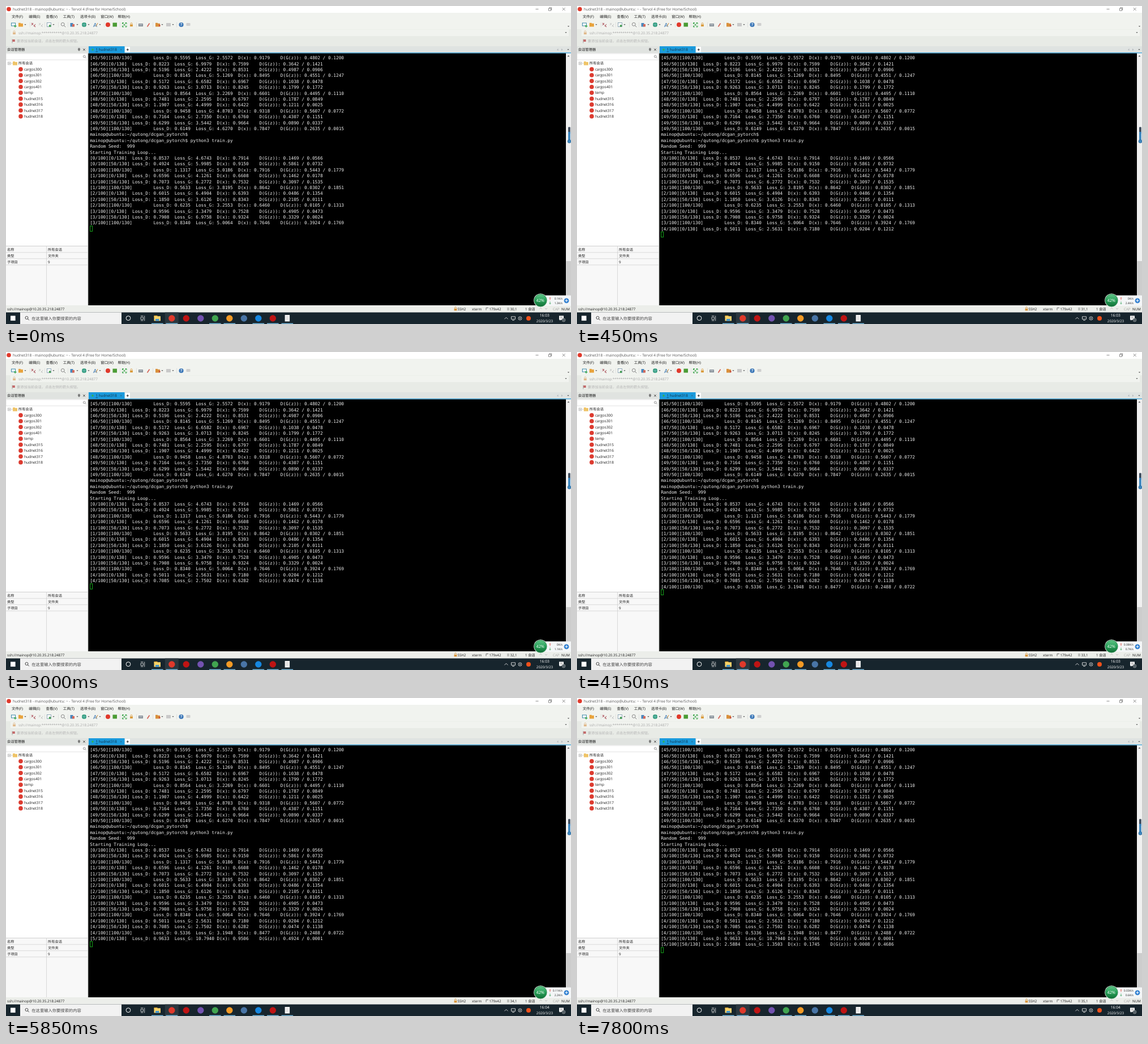
An HTML page that plays this animation: 998x561 px, repeating every 8000 ms.

```html
<!DOCTYPE html>
<html lang="zh">
<head>
<meta charset="utf-8">
<title>Terminal training log</title>
<style>
html, body { margin: 0; width: 100%; height: 100%; overflow: hidden; background: #000; }
svg { display: block; width: 998px; height: 561px; }
text { font-family: "Open Sans", "Noto Sans CJK SC", "Noto Sans CJK", sans-serif; white-space: pre; text-rendering: geometricPrecision; }
.mono { font-family: "DejaVu Sans Mono", monospace; }
</style>
</head>
<body>
<svg id="stage" viewBox="0 0 998 561"></svg>
<script>
const LOOP = 8000, ROW = 10.4;
const USER = 'mainop', ADDR = '10.20.35.218:24877', HOST = 'hudnet318';
const stage = document.getElementById('stage');
const parts = [];
const add = s => parts.push(s);

// Shape helpers; text is placed by its vertical centre.
const rect = (x, y, w, h, fill, more = '') =>
  add(`<rect x="${x}" y="${y}" width="${w}" height="${h}" fill="${fill}" ${more}/>`);
const circle = (x, y, r, fill, more = '') =>
  add(`<circle cx="${x}" cy="${y}" r="${r}" fill="${fill}" ${more}/>`);
const path = (d, stroke, width = 0.8, fill = 'none') =>
  add(`<path d="${d}" stroke="${stroke}" stroke-width="${width}" fill="${fill}"/>`);
const text = (x, y, s, size = 6.4, fill = '#1c1c1c', more = '') =>
  add(`<text x="${x}" y="${y + size * 0.36}" font-size="${size}" fill="${fill}" ${more}>${s}</text>`);
const arrow = (x, y, fill = '#333', d = 1.6) =>
  path(`M${x - d} ${y - d / 2}h${2 * d}l${-d} ${d}z`, 'none', 0, fill);
const folder = (x, y, fill) => {
  rect(x - 4, y - 3.2, 4, 2, fill);
  rect(x - 4, y - 2.2, 8, 5.8, fill, 'rx=".5"');
};
const lens = (x, y, r, color) => {
  circle(x, y, r, 'none', `stroke="${color}" stroke-width=".9"`);
  path(`M${x + r * 0.7} ${y + r * 0.7}l${r} ${r}`, color, 1);
};
const lock = (x, y, color) => {
  rect(x - 2.4, y - 0.5, 4.8, 3.6, color);
  path(`M${x - 1.4} ${y - 0.5}v-1.5a1.4 1.4 0 0 1 2.8 0v1.5`, color);
};

function titleAndMenu() {
  rect(0, 0, 998, 561, '#f0f0f0');
  rect(0, 0, 998, 12, '#fff');
  circle(5, 5.5, 3.8, '#e0392b');
  text(12, 5.7, `${HOST} - ${USER}@ubuntu: ~ - Tervol 4 (Free for Home/School)`, 6.55, '#555');
  path('M935.5 5.5h5M982.7 3l5 5m0-5l-5 5M958.5 4.2h4v4h-4zM959.7 4v-1.2h4v4h-1', '#444', 0.6);
  rect(0, 12, 998, 59, '#f1f3ef');
  let x = 10;
  for (const name of ['文件(F)', '编辑(E)', '查看(V)', '工具(T)', '选项卡(B)', '窗口(W)', '帮助(H)']) {
    text(x, 18.6, name);
    x += name.length * 6.05;
  }
}

function toolbar() {
  const y = 33;
  for (const x of [42, 68, 92, 109, 173, 201, 230, 259, 301]) rect(x, 28.5, 0.6, 9, '#d4d4d4');
  for (const x of [34, 84, 126, 146, 166, 276, 295]) arrow(x, y);
  rect(9.5, 30, 7, 5, '#fff', 'stroke="#3a87a8"');
  path('M14 35.5h4.5M16.2 33.3v4.5', '#31a24c', 1.3);
  folder(26, y, '#e8a33d');
  path('M45 30l3 3m1 1l3 3M45 34l3-4m1 6l3-4', '#b3656d', 1.1);
  path('M58 30l3 3m1 1l3 3M58 34l3-4m1 6l3-4', '#c4c4c4', 1);
  rect(72.5, 29.5, 7, 7, '#fff', 'stroke="#7795a8" stroke-width=".8"');
  circle(77.5, 35, 2, '#4aa055');
  lens(100.3, 32.3, 2.9, '#777');
  rect(113.5, 30, 5, 6.5, '#4b88bd');
  rect(117, 32, 4, 4.5, '#d46a5c');
  circle(138, y, 4, '#2f9a78');
  path('M134 33h8M138 29v8', '#9ad3e2', 0.6);
  path('M154.5 37l3-7 3 7m-5-2h4', '#3875b0', 1);
  path('M159 36l3-6', '#d08a34', 1);
  circle(180, y, 4, '#e0392b');
  rect(188.5, 29.5, 7.5, 7, '#4b9c35');
  path('M205.5 32v-2.5h2.5m2.5 0h2.5v2.5m0 2.5v2.5h-2.5m-2.5 0h-2.5v-2.5M206 30l6 6.5m0-6.5l-6 6.5', '#37a447', 1);
  lock(221.5, y, '#d99a3a');
  rect(234, 31, 8, 5, '#7d8790', 'rx=".6"');
  path('M235 32.5h6M235 34h6', '#e5e9ec', 0.6);
  path('M249.5 36.5l4-6', '#d46052', 1.6);
  folder(268, y, '#d9903c');
  rect(270, 33, 2.5, 3, '#c95040');
  rect(283, 30, 8, 6, '#c9c9c9');
  circle(309.5, y, 4.1, '#3d78b8');
  text(309.5, y, '?', 6.5, '#fff', 'text-anchor="middle" font-weight="700"');
  rect(318.5, 30, 7, 5, '#cfcfcf', 'rx="1"');
  arrow(993.5, 36);

  rect(0, 41, 998, 30, '#e8ebe6');
  rect(8, 41.5, 986, 11.5, '#f1f3ef');
  lock(14.5, 47, '#e0b98a');
  text(22, 47.4, `ssh://${USER}:**********@${ADDR}`, 6.4, '#a6a6a6');
  arrow(989, 47);
  path('M11 58.5v7', '#999', 0.8);
  rect(11.3, 59, 4.5, 4, '#c36b6b');
  text(19, 62, '要添加当前会话，点击左侧的箭头按钮。', 6.24, '#b4b4b4');
}

function sessionPanel() {
  rect(0, 71, 145.5, 12, '#e0e3e0');
  text(2, 77, '会话管理器', 6.24);
  path('M127.5 74.8h3M128 74.8v2.6m2 0v-2.6M127 77.4h4M129 77.4v2.2M136.2 75.2l3.6 3.6m0-3.6l-3.6 3.6', '#333', 0.8);
  rect(0, 83, 144, 341, '#fff');
  rect(0, 84, 144, 11, '#fff', 'stroke="#d5d5d5" stroke-width=".7"');
  lens(138.3, 89, 1.9, '#888');
  rect(3.6, 99, 4.4, 4.4, '#fff', 'stroke="#999" stroke-width=".6"');
  path('M4.5 101.2h2.6', '#444', 0.6);
  path('M8 101.2h4', '#aaa', 0.5);
  folder(16, 101, '#efc468');
  text(22, 101.2, '所有会话', 6.24);
  ['cargos300', 'cargos301', 'cargos302', 'cargos401', 'temp', 'hudnet315', 'hudnet316', 'hudnet317', HOST]
    .forEach((name, i) => {
      const y = 111.6 + i * 10.38;
      circle(26, y, 3.8, '#dc3b30');
      text(32, y, name, 6.5);
    });
  rect(0, 423, 144, 106, '#f8f8f8');
  [['名称', '所有会话'], ['类型', '文件夹'], ['子项目', '9']].forEach(([key, value], i) => {
    const y = 429.3 + i * 11;
    rect(0, y + 5.3, 144, 0.6, '#c4c4c4');
    text(2, y, key, 6.24);
    text(74, y, value, 6.24);
  });
  rect(0, 423, 144, 0.7, '#bdbdbd');
  rect(71.3, 424, 0.6, 105, '#c4c4c4');
  rect(144, 71, 2, 458, '#dcdfdc');
}

function tabs() {
  rect(146, 71, 852, 12, '#dfe3e1');
  rect(146, 71, 63.5, 12, '#1b9bdd');
  circle(153, 77, 1.7, '#35b34a');
  text(158.5, 77.2, `<tspan text-decoration="underline">1</tspan> ${HOST}`, 6.3, '#10293b');
  path('M201.8 75.5l3 3m0-3l-3 3', '#32607d', 0.7);
  rect(210.5, 72, 8.5, 10, '#fff');
  path('M212.8 77h4M214.8 75v4', '#222', 1);
  path('M975.5 75l-2.4 2 2.4 2zM981 75l2.4 2-2.4 2z', 'none', 0, '#b5b9bd');
  arrow(993, 77);
  rect(146, 82.2, 852, 1.3, '#1b9bdd');
}

// Repeatable noise in 0..1
const noise = n => {
  const v = Math.sin(n * 12.9898) * 43758.5453;
  return v - Math.floor(v);
};

// Joins fields at the 8-column tab stops of a terminal.
const tabbed = fields => fields.reduce((line, f) => line.padEnd((line.length >> 3) * 8 + 8) + f);
const logLine = (n, epochs, [d, g, x, g1, g2]) => tabbed([
  `[${Math.floor(n / 3)}/${epochs}][${n % 3 * 50}/130]`,
  `Loss_D: ${d}`, `Loss_G: ${g}`, `D(x): ${x}`, `D(G(z)): ${g1} / ${g2}`]);

// Plausible losses for a step that is already on screen
function losses(seed) {
  const value = (k, low, high) => (low + (high - low) * noise(seed * 5 + k)).toFixed(4);
  return [value(0, 0.3, 1.2), value(1, 1.5, 7), value(2, 0.62, 0.97), value(3, 0.01, 0.6), value(4, 0, 0.2)];
}
const pastLines = (first, count, epochs) => Array.from({ length: count },
  (_, i) => logLine(first + i, epochs, losses(first + i + epochs)));

// Steps that finish during the loop, and when
const arrivals = [
  [450, '0.5011 2.5631 0.7180 0.0204 0.1212'],
  [2200, '0.7085 2.7502 0.6282 0.0474 0.1138'],
  [4150, '0.5336 3.1948 0.8477 0.2488 0.0722'],
  [5300, '0.9633 10.7940 0.9506 0.4924 0.0001'],
  [7200, '2.5884 1.3503 0.1745 0.0008 0.4686'],
];

function terminal() {
  rect(145.3, 83.5, 843.7, 444.5, '#000');
  const prompt = `${USER}@ubuntu:~/qutong/dcgan_pytorch$`;
  [...pastLines(45 * 3 + 2, 13, 50), prompt, prompt + ' python3 train.py',
    'Random Seed:  999', 'Starting Training Loop...', ...pastLines(0, 12, 100),
    ...arrivals.map(([, row], i) => logLine(12 + i, 100, row.split(' ')))]
    .forEach((line, i) => text(148.2, 91.4 + i * ROW, line, 7.77, '#efefef', 'class="mono"'));
  rect(148.6, 0, 4, 9.4, 'none', 'id="cursor" stroke="#19b51f" stroke-width=".9"');
  rect(989, 83.5, 9, 445.5, '#f0f0f0');
  path('M991.5 89.2l2-2.2 2 2.2z', 'none', 0, '#555');
  rect(989.5, 450, 8.5, 66, '#cdcdcd');
  rect(993, 213.5, 3.8, 12, '#3d4b5c', 'rx="1"');
  rect(993, 222, 3.8, 16, '#3b86bf');
  circle(995, 238.8, 3, '#3b86bf', 'stroke="#275f8c" stroke-width=".6"');
}

function statusBar() {
  rect(0, 528, 998, 12.5, '#eceeea');
  text(2, 534.7, `ssh://${USER}@${ADDR}`, 6.3);
  lock(794, 534.3, '#d9953a');
  text(797.5, 534.7, 'SSH2', 6.2);
  text(823, 534.7, 'xterm', 6.2);
  path('M848 536.5v-4h4', '#555', 0.8);
  text(853.5, 534.7, '179x42', 6.2);
  path('M886 532v5M888 532v5', '#777', 0.8);
  text(890.5, 534.7, '', 6.2, '#1c1c1c', 'id="position"');
  text(917, 534.7, '1 会话', 6.2);
  path('M942.5 534.5l2-2 2 2M952 533l2 2 2-2', '#bbb', 1);
  text(966, 534.7, 'CAP', 6.2, '#a5a5a5');
  text(981, 534.7, 'NUM', 6.2);
}

function speedWidget() {
  add(`<linearGradient id="ball" x2="0" y2="1"><stop stop-color="#63c68a"/>
    <stop offset=".5" stop-color="#27a058"/><stop offset="1" stop-color="#137038"/></linearGradient>`);
  rect(946, 510.5, 58, 18.5, '#f4f6f7', 'rx="8"');
  circle(944.2, 519.3, 12, '#d5e8da');
  circle(944.2, 519.3, 10.8, 'url(#ball)', 'stroke="#187a40" stroke-width=".8"');
  text(943.7, 519.4, '42%', 7.4, '#fff', 'text-anchor="middle"');
  path('M961 518.7v-4.4m-1.3 1.5l1.3-1.5 1.3 1.5', '#e2574c', 0.8);
  path('M961 521.5v4.4m-1.3-1.5l1.3 1.5 1.3-1.5', '#35a35a', 0.8);
  text(983, 516.6, '', 5, '#222', 'id="up" text-anchor="end"');
  text(983, 524, '', 5, '#222', 'id="down" text-anchor="end"');
  circle(990, 519.8, 4.4, '#2f7fd0');
  path('M987.5 519.8h5M990 517.3v5', '#fff', 1.1);
}

function taskbar() {
  rect(0, 540.5, 998, 20.5, '#17252d');
  rect(8, 546.5, 8.6, 8.6, '#fff');
  rect(25, 540.5, 179, 20.5, '#f2f2f2');
  lens(36.5, 550, 2.5, '#333');
  text(45.3, 551, '在这里输入你要搜索的内容', 7.3, '#454545');
  circle(216, 550.7, 3.9, 'none', 'stroke="#fff" stroke-width="1"');
  path('M238 549h4.5v4h-4.5zM238 546.8h4.5M238 555h4.5M244.7 546.5v9', '#e8e8e8', 0.8);
  // Pinned programs, evenly spaced
  const slot = i => 267.3 + i * 25.5;
  rect(slot(1) - 12, 540.5, 24, 20.5, '#2b373e');
  rect(261.5, 546, 6, 3, '#e0a52c');
  rect(261.5, 547.2, 11.5, 8.3, '#f7d269');
  rect(264, 552, 6.5, 3.5, '#4497cf');
  ['#e0392b', '#bf1414', '#7352b0', '#41a550', '#f39a25', '#4975a6', '#1687e0', '#bf1414']
    .forEach((fill, i) => circle(slot(i + 1), 551, 5.7, fill));
  rect(slot(9) - 4.2, 545, 8.5, 11.5, '#f4f4f4');
  path(`M${slot(9) - 2.5} 548h5m-5 2.3h5m-5 2.3h5`, '#b5b5b5', 0.6);
  for (const i of [0, 1, 4, 5, 7, 8, 9]) rect(slot(i) - 10.3, 559.6, 20.6, 1.4, '#76b9dd');
  path('M880.5 552.3l3-3 3 3M892.5 548h7v4.5h-7zM894 554.5h4', '#e4e4e4', 0.9);
  circle(908, 551, 3, 'none', 'stroke="#ddd" stroke-width=".8"');
  path('M906.5 549.5l3 3m0-3l-3 3', '#ddd', 0.7);
  circle(923, 551, 4, '#f1511b');
  text(951.3, 546, '', 6.7, '#fff', 'id="clock" text-anchor="middle"');
  text(951.5, 555.3, '2020/3/23', 6.2, '#fff', 'text-anchor="middle"');
  path('M977 546.5h8v7h-5l-1.5 1.7v-1.7H977z', 'none', 0, '#fff');
  path('M978.5 548.7h5M978.5 550.7h5', '#555', 0.6);
  circle(985, 554, 3, '#3d4a51', 'stroke="#ccc" stroke-width=".5"');
  text(985, 554, '1', 4.4, '#fff', 'text-anchor="middle"');
}

[titleAndMenu, toolbar, sessionPanel, tabs, terminal, statusBar, speedWidget, taskbar].forEach(draw => draw());
stage.innerHTML = parts.join('');

const el = id => document.getElementById(id);
const lines = [...stage.querySelectorAll('.mono')];
const firstCount = lines.length - arrivals.length;

// Network speeds jitter at a steady beat; idle uploads read 0.
function showSpeeds(t) {
  const beat = Math.floor((t + 145) / 396);
  const up = Math.max(0, noise(beat + 1) * 0.2 - 0.08);
  const down = 0.5 + 2.2 * noise(beat + 40) ** 2;
  el('up').textContent = +up.toFixed(2) + 'K/s';
  el('down').textContent = +down.toFixed(1) + 'K/s';
}

const start = performance.now();
function frame() {
  const t = (performance.now() - start) % LOOP;
  const count = firstCount + arrivals.filter(([time]) => t >= time).length;
  lines.forEach((line, i) => line.setAttribute('visibility', i < count ? 'visible' : 'hidden'));
  el('cursor').setAttribute('y', 86.4 + count * ROW);
  el('position').textContent = `${count + 1},1`;
  el('clock').textContent = t < 5850 ? '16:03' : '16:04';
  showSpeeds(t);
  requestAnimationFrame(frame);
}
frame();
</script>
</body>
</html>
```
